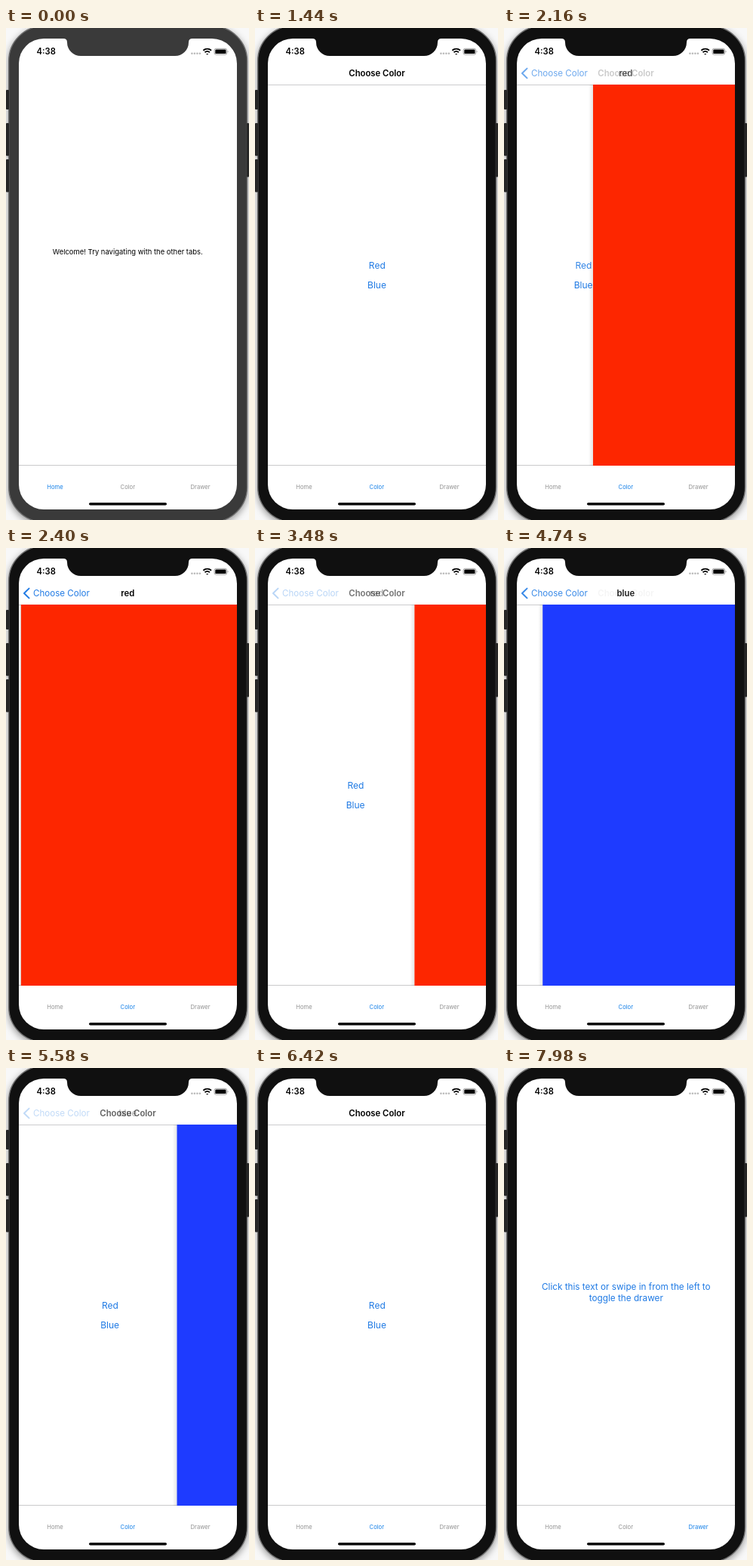
Recreate the animation shown at these times as an HTML page. Size 322 px wide and 652 px high, loop 8 s.

```html
<!DOCTYPE html>
<html lang="en">
<head>
<meta charset="utf-8">
<title>Tab and stack navigation</title>
<style>
  html, body { margin: 0; width: 100%; height: 100%; overflow: hidden; background: #fff; }
  svg { display: block; width: 322px; height: 652px; font-family: Inter, Roboto, sans-serif; }
  .mid { text-anchor: middle; }
  .link { fill: #1f7ae4; }
  .title { font-size: 11.3px; font-weight: 600; }
  .button { font-size: 12px; }
  .tabs text { font-size: 7.65px; fill: #929292; }
  .tabs text.on { fill: #1680e8; }
  .line { stroke: #c4c4c6; stroke-width: .9; }
  #body { filter: drop-shadow(0 3px 5px rgba(0, 0, 0, .4)); }
</style>
</head>
<body>
<svg viewBox="0 0 322 652">
  <defs>
    <clipPath id="screen"><rect x="17" y="14" width="289" height="624" rx="33"/></clipPath>
    <clipPath id="stage"><rect x="17" y="75" width="289" height="505"/></clipPath>
    <linearGradient id="edge">
      <stop offset="0" stop-color="#000" stop-opacity="0"/>
      <stop offset="1" stop-color="#000" stop-opacity=".1"/>
    </linearGradient>
  </defs>

  <rect width="322" height="652" fill="#f8f8f8"/>
  <rect id="body" x="3.7" y="-2.5" width="315.8" height="657" rx="46" stroke="#6c6c6c" stroke-width="1.4"/>
  <g fill="#262626">
    <rect y="82" width="4" height="26" rx="1"/>
    <rect y="126" width="4" height="43.5" rx="1"/>
    <rect y="174" width="4" height="43.5" rx="1"/>
    <rect x="319" y="126" width="3" height="71.5" rx="1"/>
  </g>

  <g clip-path="url(#screen)">
    <rect x="17" y="14" width="289" height="624" fill="#fff"/>

    <g class="tabs mid">
      <path class="line" d="M17 579.5H306"/>
      <text x="65" y="610.7">Home</text>
      <text x="161.3" y="610.7">Color</text>
      <text x="257.6" y="610.7">Drawer</text>
    </g>

    <text id="home" class="mid" x="161.3" y="300" font-size="9.45">Welcome! Try navigating with the other tabs.</text>

    <g id="color">
      <path class="line" d="M17 75.4H306"/>
      <g clip-path="url(#stage)">
        <g id="list" class="mid link button">
          <text id="red" x="161.8" y="319">Red</text>
          <text id="blue" x="161.5" y="345">Blue</text>
        </g>
        <g id="card">
          <rect x="11" y="75" width="6" height="505" fill="url(#edge)"/>
          <rect id="fill" x="17" y="75" width="289" height="505"/>
        </g>
      </g>
      <text id="listTitle" class="mid title" x="161.5" y="64.3">Choose Color</text>
      <text id="cardTitle" class="mid title" x="161.3" y="64.3"></text>
      <g id="back" class="link">
        <path d="M30.5 53.6L24 60L30.5 66.4" fill="none" stroke="#1f7ae4" stroke-width="2"
              stroke-linecap="round" stroke-linejoin="round"/>
        <text x="36" y="64.3" font-size="11.6">Choose Color</text>
      </g>
    </g>

    <g id="drawer" class="mid link" font-size="11.75">
      <text x="161.8" y="294">Click this text or swipe in from the left to</text>
      <text x="161.8" y="309">toggle the drawer</text>
    </g>

    <rect x="110" y="629" width="103" height="3.6" rx="1.8"/>

    <text x="40.5" y="35.2" font-size="11.2" font-weight="600">4:38</text>
    <path d="M246.4 33.8H257" stroke="#b9b9b9" stroke-width="2.6" stroke-linecap="round" stroke-dasharray="0 3.5"/>
    <g fill="none" stroke="#000" stroke-width="1.9">
      <path d="M261.4 29.8a7.6 7.6 0 0 1 10.6 0"/>
      <path d="M263.5 32.3a4.6 4.6 0 0 1 6.4 0"/>
      <path d="M265 33.9h3.4L266.7 35.6z" fill="#000" stroke="none"/>
    </g>
    <rect x="276.1" y="27.3" width="16.6" height="8" rx="2.3" fill="none" stroke="#8c8c8c" stroke-width=".8"/>
    <rect x="277.3" y="28.5" width="14.2" height="5.6" rx="1.2"/>
    <path d="M293.7 30a1.4 1.4 0 0 1 0 2.6z" fill="#8c8c8c"/>
  </g>
  <path id="notch" d="M76 13H247V14Q242 14 242 19A18 18 0 0 1 224 37H99A18 18 0 0 1 81 19Q81 14 76 14Z"/>
</svg>

<script>
const LOOP = 8000, WIDTH = 289, SLIDE = 500, PRESS = 190;
const TABS = [[0, 'home'], [1020, 'color'], [6780, 'drawer']];
const VISITS = [
  { name: 'red', fill: '#fd2600', open: 2055, close: 3370 },
  { name: 'blue', fill: '#1e3bff', open: 4558, close: 5457 },
];
const el = Object.fromEntries([...document.querySelectorAll('[id]')].map(e => [e.id, e]));
const labels = [...document.querySelectorAll('.tabs text')];
const clamp = v => Math.min(1, Math.max(0, v));

// cubic-bezier(.2833, .99, .31833, .99)
function ease(x) {
  if (x <= 0 || x >= 1) return clamp(x);
  const curve = (a, b, s) => 3 * (1 - s) ** 2 * s * a + 3 * (1 - s) * s * s * b + s ** 3;
  let lo = 0, hi = 1;
  for (let i = 0; i < 24; i++) {
    const s = (lo + hi) / 2;
    if (curve(.2833, .31833, s) < x) lo = s; else hi = s;
  }
  return curve(.99, .99, lo);
}

// Touch feedback: dims before the release, then recovers.
function pressed(t, release) {
  const down = clamp((t - release + PRESS) / 150);
  const up = clamp((t - release) / 120);
  return 1 - .7 * down * (1 - up);
}

function render(t) {
  const tab = TABS.filter(([at]) => t >= at).pop()[1];
  TABS.forEach(([, name], i) => {
    el[name].style.display = name === tab ? '' : 'none';
    labels[i].classList.toggle('on', name === tab);
  });

  const bezel = t < 60 ? '#3a3a3a' : '#101010';
  el.body.setAttribute('fill', bezel);
  el.notch.setAttribute('fill', bezel);

  const visit = VISITS.filter(v => t >= v.open).pop() || VISITS[0];
  const p = ease((t - visit.open) / SLIDE) - ease((t - visit.close) / SLIDE);
  el.fill.setAttribute('fill', visit.fill);
  el.cardTitle.textContent = visit.name;
  el.card.style.display = p > 0 ? '' : 'none';
  el.card.setAttribute('transform', `translate(${WIDTH * (1 - p)})`);
  el.list.setAttribute('transform', `translate(${-.3 * WIDTH * p})`);
  el.listTitle.style.opacity = (1 - p) ** 1.5;
  el.cardTitle.style.opacity = p;
  el.back.style.opacity = p * pressed(t, visit.close);
  for (const v of VISITS) el[v.name].style.opacity = pressed(t, v.open);
}

const start = performance.now();
function tick() {
  render((performance.now() - start) % LOOP);
  requestAnimationFrame(tick);
}
tick();
</script>
</body>
</html>
```
